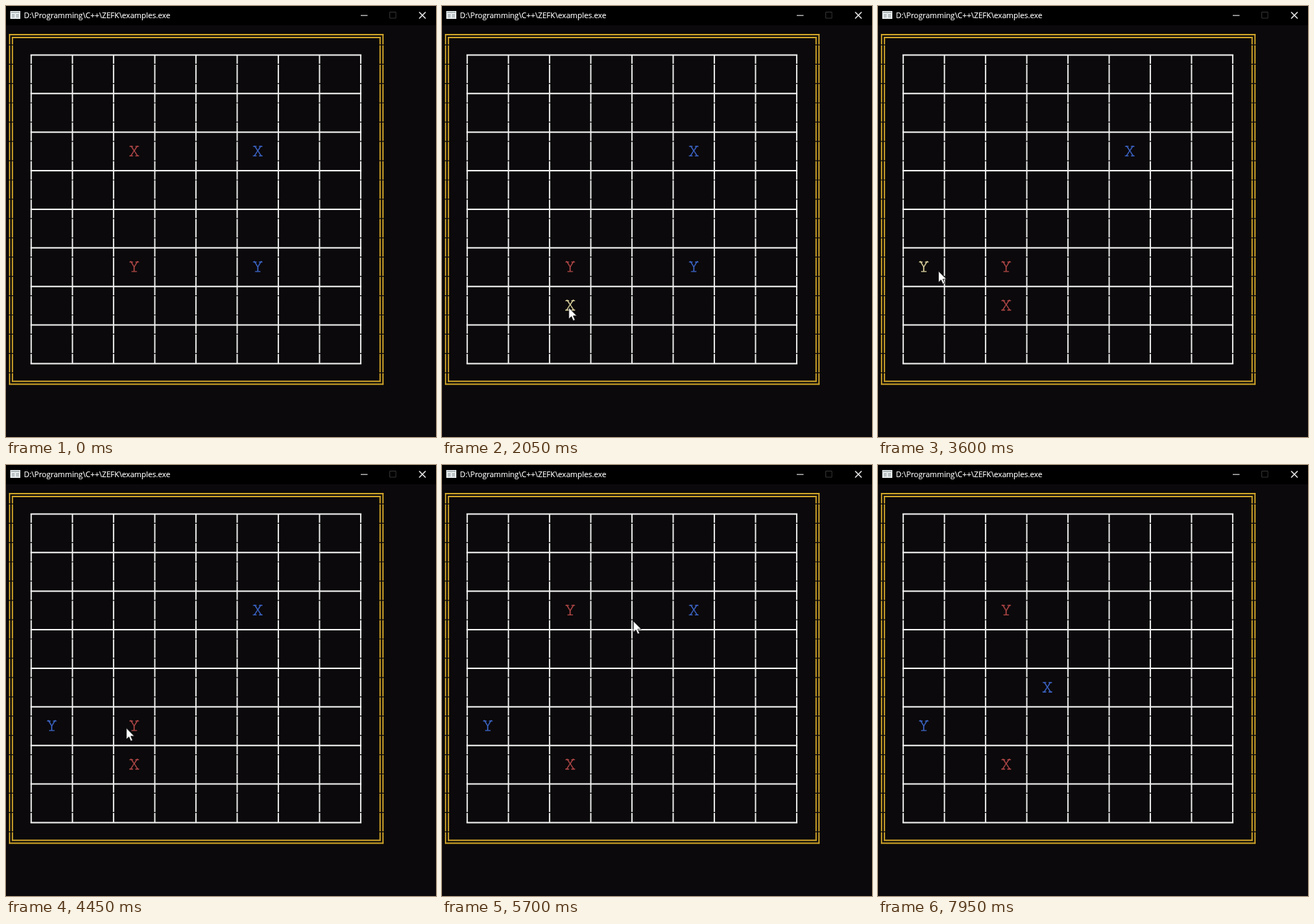
Animation, 600 px wide and 602 px high, one loop 8 s. Source, as an HTML page:

```html
<!DOCTYPE html>
<html lang="en">
<head>
<meta charset="utf-8">
<title>Console board</title>
<style>
  html, body { margin: 0; width: 100%; height: 100%; overflow: hidden; background: #0b090b; }
  svg { display: block; width: 600px; height: 602px; }
  .title { font: 10.65px "Open Sans", "Noto Sans", sans-serif; fill: #fff; stroke: #fff; stroke-width: .15; }
  .piece text {
    font: 22px "Liberation Mono", monospace; text-anchor: middle;
    fill: currentColor; stroke: #0b090b; stroke-width: .4;
  }
  .piece path { stroke: currentColor; stroke-width: 1.3; fill: none; }
</style>
</head>
<body>
<svg viewBox="0 0 600 602">
  <rect width="600" height="602" fill="#0b090b"/>
  <rect width="600" height="27" fill="#000"/>
  <rect x="6" y="7" width="14" height="11" fill="#e8ecec"/>
  <path d="M7 9h12M8 12.5h4M8 15h4M14 12.5h4M14 15h4" stroke="#7f8c90"/>
  <text class="title" x="25" y="17">D:\Programming\C++\ZEFK\examples.exe</text>
  <g fill="none" stroke="#fff">
    <path d="M495 13.2h9.5"/>
    <path d="M535.5 8.5h8.5v8.5h-8.5z" stroke="#333"/>
    <path d="M576.5 8.5l9 9m0-9l-9 9" stroke-width="1.3"/>
  </g>
  <g id="board" fill="none"></g>
  <g id="pieces"></g>
  <path id="cursor" d="M0 .5v15.6l3.6-3.4 2.5 5.8 2.5-1.1-2.5-5.6h5z" fill="#fff" stroke="#111" stroke-width=".7"/>
</svg>
<script>
const LOOP = 8000, STEP = 50;
const LEFT = 35.2, TOP = 68.5, CELL_W = 57.47, CELL_H = 53.87, ROW = CELL_H / 2;
const RED = "#b24848", BLUE = "#3e67cb", HELD = "#e0d6a2", GOLD = "#c89f28", WHITE = "#f2f2f2";

const byId = id => document.getElementById(id);

function add(parent, tag, attrs) {
  const el = document.createElementNS("http://www.w3.org/2000/svg", tag);
  for (const k in attrs) el.setAttribute(k, attrs[k]);
  return parent.appendChild(el);
}

function line(d, stroke, width, dash = {}) {
  add(byId("board"), "path", { d, stroke, "stroke-width": width, ...dash });
}

const horizontal = (y, x1, x2, color) => line(`M${x1 - 1} ${y}H${x2 + 1}`, color, 2);

// Vertical rules break slightly at each text row.
function vertical(x, y1, y2, color) {
  const offset = (y1 - TOP + ROW * 2.5) % ROW;
  line(`M${x} ${y1}V${y2}`, color, 1.8, {
    "stroke-dasharray": `${ROW - 1.2} 1.2`, "stroke-dashoffset": offset
  });
}

function drawBoard() {
  for (const inset of [0, 4]) {
    const l = 5 + inset, r = 526 - inset, t = 40 + inset, b = 528.2 - inset;
    for (const x of [l, r]) vertical(x, t, b, GOLD);
    for (const y of [t, b]) horizontal(y, l, r, GOLD);
  }
  for (let i = 0; i <= 8; i++) {
    vertical(LEFT + i * CELL_W, TOP, TOP + 8 * CELL_H, WHITE);
    horizontal(TOP + i * CELL_H, LEFT, LEFT + 8 * CELL_W, WHITE);
  }
}

// One turn per piece: the cursor picks it up at one point and drops it at another.
const FIRST = 1100, PERIOD = 1700, HOLD = 960, CARRY = 900, TRAVEL = 480, BOW = 12;
const turns = [
  { letter: "X", color: RED, from: [183, 197], to: [177, 421] },
  { letter: "Y", color: BLUE, from: [350, 366], to: [75, 370] },
  { letter: "Y", color: RED, from: [168, 367], to: [184, 206] },
  { letter: "X", color: BLUE, from: [350, 205], to: [238, 314] }
];
const ENTRY = [232, -40], EXIT = [187, 407];

function glide(a, b, u, bow = 0) {
  u = Math.min(u, 1);
  const e = u * u * (3 - 2 * u);
  return [a[0] + (b[0] - a[0]) * e, a[1] + (b[1] - a[1]) * e + bow * Math.sin(Math.PI * u)];
}

function cursorAt(t) {
  const k = Math.floor((t - FIRST) / PERIOD);
  const since = t - FIRST - k * PERIOD;
  const turn = turns[k], next = turns[k + 1];
  const rest = turn ? turn.to : ENTRY;
  if (since >= HOLD) return glide(rest, next ? next.from : EXIT, (since - HOLD) / TRAVEL, BOW);
  return turn ? glide(turn.from, turn.to, since / CARRY) : ENTRY;
}

const cellOf = ([x, y]) => [Math.floor((x - LEFT) / CELL_W), Math.floor((y - TOP) / CELL_H)];

function drawPieces() {
  const top = "M-6.6-6.4h5M1.6-6.4h5";
  const serifs = { X: top + "M-6.8 6.8h5.2M1.6 6.8h5.2", Y: top + "M-3.8 6.8h7.6" };
  for (const p of turns) {
    p.el = add(byId("pieces"), "g", { class: "piece" });
    add(p.el, "text", { y: 7.4 }).textContent = p.letter;
    add(p.el, "path", { d: serifs[p.letter] });
  }
}

function render(t) {
  const cursor = cursorAt(t);
  turns.forEach((p, i) => {
    const since = t - FIRST - i * PERIOD;
    const held = since >= 0 && since < HOLD;
    const [col, row] = cellOf(held ? cursor : since < 0 ? p.from : p.to);
    const x = LEFT + (col + .5) * CELL_W, y = TOP + (row + .5) * CELL_H - .7;
    p.el.setAttribute("transform", `translate(${x} ${y})`);
    p.el.setAttribute("color", held ? HELD : p.color);
  });
  byId("cursor").setAttribute("transform", `translate(${cursor.join(" ")})`);
}

drawBoard();
drawPieces();
const start = performance.now();
function tick() {
  const t = (performance.now() - start) % LOOP;
  render(Math.floor(t / STEP) * STEP);
  requestAnimationFrame(tick);
}
render(0);
requestAnimationFrame(tick);
</script>
</body>
</html>
```
